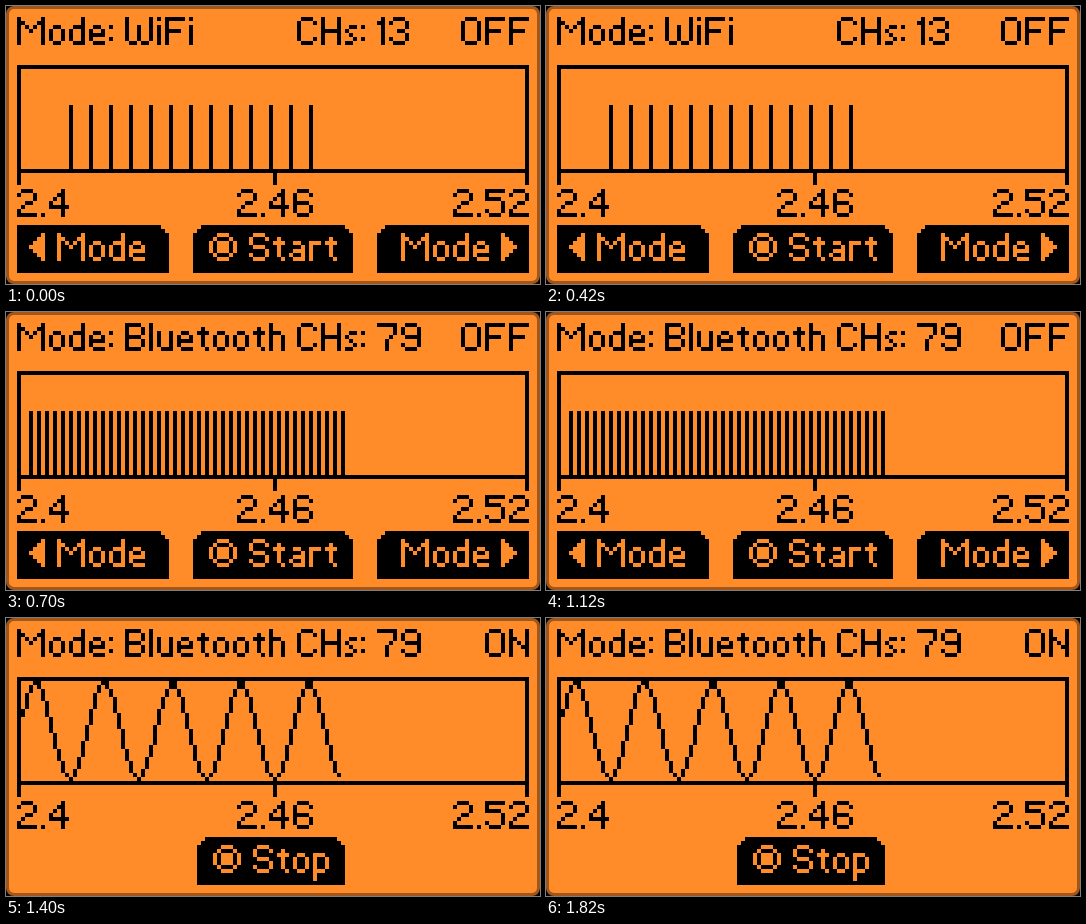
Animation, 534 px wide and 278 px high, one loop 2.1 s. Source, as an HTML page:

```html
<!DOCTYPE html>
<html lang="en">
<head>
<meta charset="utf-8">
<title>Channel jammer screen</title>
<style>
html, body { margin: 0; width: 100%; height: 100%; overflow: hidden; background: #000; }
svg { display: block; }
</style>
</head>
<body>
<svg id="stage" width="534" height="278" viewBox="0 0 534 278">
  <rect x="1.5" y="1.5" width="531" height="275" rx="6.5" fill="#ff8b29" stroke="#a1571c" stroke-width="3"/>
  <g id="lcd" transform="translate(11 11) scale(4)" shape-rendering="crispEdges"></g>
</svg>
<script>
const INK = '#000', PAPER = '#ff8b29';
const HOLD = 700;

// Stroke font: polylines of xy digit pairs, baseline on row 6.
const FONT = {
  M: '06 00 33 60 66', W: '00 05|16 26|32 35|46 56|60 65',
  B: '00 06 36 45 44 33 42 41 30 00|03 33', C: '41 30 10 01 05 16 36 45',
  F: '40 00 06|03 33', H: '00 06|40 46|03 43', N: '00 06|01 45|40 46',
  O: '10 30 41 45 36 16 05 01 10', S: '41 30 10 01 02 13 33 44 45 36 16 05',
  a: '12 22 33 36 16 05 14 34', d: '30 36 16 05 03 12 32',
  e: '04 34 33 22 12 03 05 16 36', h: '00 06|02 22 33 36', i: '00|02 06',
  l: '00 06', o: '12 22 33 35 26 16 05 03 12', p: '08 02 22 33 35 26 06',
  r: '02 06|03 12 22', s: '22 12 03 25 16 06', t: '11 15 26|02 22',
  u: '02 05 16 36|32 36',
  1: '01 10 16', 2: '01 10 30 41 42 33 23 05 06 46',
  3: '01 10 30 41 42 33 44 45 36 16 05|23 33', 4: '36 30 03 04 44',
  5: '40 00 02 32 43 45 36 16 05', 6: '41 30 10 01 05 16 36 45 44 33 03',
  7: '00 40 42 24 26', 9: '05 16 36 45 41 30 10 01 02 13 43',
  '.': '06', ':': '02|05'
};

function add(parent, tag, attrs = {}) {
  const el = document.createElementNS('http://www.w3.org/2000/svg', tag);
  for (const k in attrs) el.setAttribute(k, attrs[k]);
  return parent.appendChild(el);
}

const box = (x, y, w, h) => `M${x} ${y}h${w}v${h}h${-w}z`;
const fill = (g, d, color = INK) => add(g, 'path', { d, fill: color });

// Pixel line; on a tie the column stays with the upper end.
function line(x1, y1, x2, y2) {
  if (y1 > y2) [x1, y1, x2, y2] = [x2, y2, x1, y1];
  const n = Math.max(Math.abs(x2 - x1), y2 - y1);
  const near = v => Math.sign(v) * Math.ceil(Math.abs(v) - 0.5);
  let d = '';
  for (let i = 0; i <= n; i++) {
    const k = n ? i / n : 0;
    d += box(x1 + near((x2 - x1) * k), y1 + near((y2 - y1) * k), 1, 1);
  }
  return d;
}

function polyline(points) {
  let d = line(...points[0], ...points[0]);
  for (let i = 1; i < points.length; i++) d += line(...points[i - 1], ...points[i]);
  return d;
}

function text(g, str, x, y, color = INK, alignRight = false) {
  let d = '', pen = 0;
  const glyphs = [];
  for (const ch of str) {
    if (ch === ' ') { pen += 2; continue; }
    const strokes = FONT[ch].split('|').map(s => s.split(' ').map(p => [+p[0], +p[1]]));
    glyphs.push([strokes, pen]);
    pen += Math.max(...strokes.flat().map(p => p[0])) + 2;
  }
  const left = alignRight ? x - pen + 1 : x;
  for (const [strokes, at] of glyphs)
    for (const s of strokes) d += polyline(s.map(([px, py]) => [left + at + px, y + py]));
  const group = add(g, 'g', { role: 'img', 'aria-label': str });
  add(group, 'title').textContent = str;
  fill(group, d, color);
}

function arrow(g, tip, dir) {
  let d = '';
  for (let i = 0; i < 4; i++) d += box(tip + dir * i, 57 - i, 1, 2 * i + 1);
  fill(g, d, PAPER);
}

// Button body with stepped corners on the chosen sides.
function tab(g, x, w, left, right) {
  let d = box(x, 52, w, 12);
  for (let i = 0; i < 3; i++) {
    if (left) d += box(x - 1 - i, 52 + i, 1, 12 - i);
    if (right) d += box(x + w + i, 52 + i, 1, 12 - i);
  }
  fill(g, d);
}

function centerButton(g, label, x, w) {
  tab(g, x, w, true, true);
  const ix = x + 1, iy = 54;
  const ring = [[2, 0], [4, 0], [6, 2], [6, 4], [4, 6], [2, 6], [0, 4], [0, 2], [2, 0]];
  fill(g, polyline(ring.map(([a, b]) => [ix + a, iy + b])) + box(ix + 2, iy + 2, 3, 3), PAPER);
  text(g, label, ix + 10, iy, PAPER);
}

function sideButtons(g) {
  tab(g, 0, 35, false, true);
  arrow(g, 3, 1);
  text(g, 'Mode', 10, 54, PAPER);
  tab(g, 93, 35, true, false);
  arrow(g, 124, -1);
  text(g, 'Mode', 96, 54, PAPER);
}

function bars(g, first, step, count) {
  let d = '';
  for (let i = 0; i < count; i++) d += box(first + i * step, 22, 1, 16);
  fill(g, d);
}

function wave(g) {
  const pts = [];
  for (let x = 1; x <= 80; x++)
    pts.push([x, Math.round(25 - 12 * Math.sin(x * 2 * Math.PI * 7.5 / 128))]);
  fill(g, polyline(pts));
}

const lcd = document.getElementById('lcd');

function scene(mode, channels, running, plot) {
  const g = add(lcd, 'g');
  text(g, 'Mode: ' + mode, 0, 0);
  text(g, 'CHs: ' + channels, 70, 0);
  text(g, running ? 'ON' : 'OFF', 128, 0, INK, true);
  plot(g);
  if (running) centerButton(g, 'Stop', 48, 31);
  else {
    sideButtons(g);
    centerButton(g, 'Start', 47, 34);
  }
  return g;
}

// Axis, ticks and frequency labels stay put.
fill(lcd, box(0, 12, 128, 1) + box(0, 38, 128, 1) + box(0, 12, 1, 30) +
  box(127, 12, 1, 30) + box(64, 38, 1, 4));
text(lcd, '2.4', 0, 43);
text(lcd, '2.46', 55, 43);
text(lcd, '2.52', 128, 43, INK, true);

const scenes = [
  scene('WiFi', 13, false, g => bars(g, 13, 5, 13)),
  scene('Bluetooth', 79, false, g => bars(g, 3, 2, 40)),
  scene('Bluetooth', 79, true, wave)
];

function show(ms) {
  const now = Math.floor(ms / HOLD) % scenes.length;
  scenes.forEach((g, i) => g.setAttribute('display', i === now ? 'inline' : 'none'));
}

const start = performance.now();
function tick() {
  show(performance.now() - start);
  requestAnimationFrame(tick);
}
tick();
</script>
</body>
</html>
```
